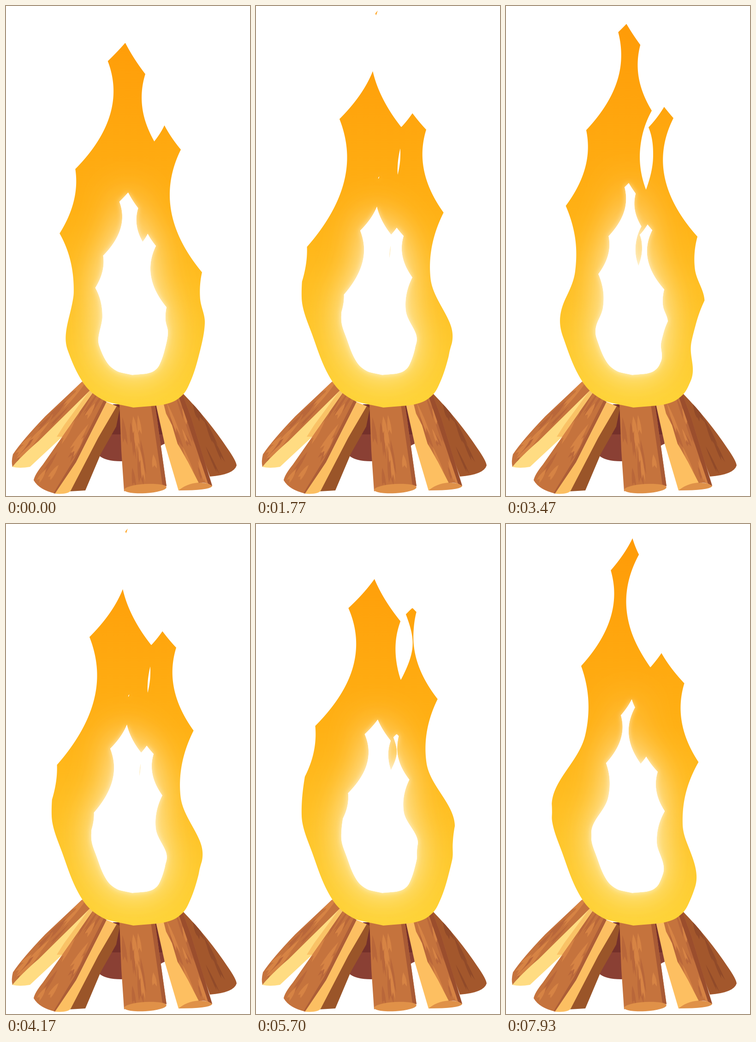
Animation, 529 px wide and 1058 px high, one loop 8000 ms. Source, as an HTML page with a canvas:

```html
<!DOCTYPE html>
<html lang="en">
<head>
<meta charset="utf-8">
<title>Campfire</title>
<style>
  html, body { margin: 0; width: 100%; height: 100%; overflow: hidden; background: #fff; }
  canvas { display: block; width: 100%; height: 100%; }
</style>
</head>
<body>
<canvas id="stage" width="529" height="1058"></canvas>
<script>
const canvas = document.getElementById('stage');
const ctx = canvas.getContext('2d');
const LOOP = 8000;
const FRAME = 1000 / 30;
const CYCLE = 6;
const BASE = 867;
const SPLIT = 460;
const MAX_BITE = 48;

// The flame is two fixed tongues. Crests climb along each edge and the edge
// is hollowed out between them. Edge keys are [y, x]; inward is the hollow's side.
const sides = {
  left: {
    inward: 1, lag: 0, from: 0,
    slow: age => climb(age, 743, 27, 5, 62.5),
    fast: age => 856 - 84 * age,
    edge: spline([[-50, 285], [0, 265], [118, 221], [306, 163], [497, 115], [630, 99],
      [710, 122], [810, 165], [852, 213], [BASE, 276]])
  },
  right: {
    inward: -1, lag: -1, from: 0,
    slow: age => climb(age, 810, 5, 8, 68),
    fast: age => 960 - 77 * age,
    edge: spline([[165, 340], [242, 363], [420, 402], [575, 425], [685, 431],
      [755, 418], [815, 398], [845, 377], [861, 340], [BASE, 276]])
  },
  innerRight: {
    inward: -1, lag: 0, from: -CYCLE,
    slow: age => 525 - 63 * age,
    fast: age => 306 - 80 * age,
    edge: spline([[-50, 268], [24, 281], [147, 302], [226, 316], [310, 330], [400, 338], [SPLIT, 338]])
  },
  innerLeft: {
    inward: 1, lag: 0, from: -CYCLE,
    slow: age => 570 - 75 * age,
    fast: age => 336 - 74 * age,
    edge: spline([[165, 340], [188, 327], [262, 309], [325, 286], [392, 264], [SPLIT, 250]])
  }
};

// Height after speeding up evenly from v to top speed.
function climb(age, y, v, acc, top) {
  const t = Math.min(age, (top - v) / acc);
  return y - v * t - acc * t * t / 2 - top * (age - t);
}

function spline(keys) {
  const slope = i => {
    const a = keys[Math.max(0, i - 1)], b = keys[Math.min(keys.length - 1, i + 1)];
    return (b[1] - a[1]) / (b[0] - a[0]);
  };
  return y => {
    let i = 0;
    while (i < keys.length - 2 && y > keys[i + 1][0]) i++;
    const [y0, x0] = keys[i], [y1, x1] = keys[i + 1];
    const h = y1 - y0, t = (y - y0) / h, u = 1 - t;
    return u * u * ((1 + 2 * t) * x0 + t * h * slope(i)) +
           t * t * ((3 - 2 * t) * x1 - u * h * slope(i + 1));
  };
}

function crestsAt(side, phase) {
  const list = [];
  for (let age = phase + side.lag - CYCLE; age < CYCLE * 4; age += CYCLE) {
    if (age < side.from) continue;
    const slow = side.slow(age), fast = side.fast(age);
    list.push(slow);
    if (fast < slow - 25) list.push(fast);
  }
  return list.sort((a, b) => a - b);
}

// Returns x for a given y on a hollowed edge.
function hollowed(side, phase) {
  const crests = crestsAt(side, phase);
  return y => {
    const i = crests.findIndex(c => c > y);
    if (i < 1) return side.edge(y);
    const chord = crests[i] - crests[i - 1];
    const t = (y - crests[i - 1]) / chord;
    const soft = crests[i] > 600 && t > 0.5;
    const bend = soft ? Math.sin(Math.PI * t) ** 2 : 4 * t * (1 - t);
    return side.edge(y) + side.inward * bend * Math.min(MAX_BITE, chord * chord / 1300);
  };
}

// Adds the area between two edges, leaving out heights where they cross.
function addBand(path, left, right, top, bottom) {
  let run = [];
  const flush = () => {
    if (run.length > 1) {
      run.forEach(([y, l], i) => i ? path.lineTo(l, y) : path.moveTo(l, y));
      run.reverse().forEach(([y, , r]) => path.lineTo(r, y));
      path.closePath();
    }
    run = [];
  };
  for (let y = top; y <= bottom; y++) {
    const l = left(y), r = right(y);
    if (l <= r) run.push([y, l, r]);
    else flush();
  }
  flush();
}

function flameAt(phase) {
  const path = new Path2D();
  const [left, right, innerRight, innerLeft] =
    [sides.left, sides.right, sides.innerRight, sides.innerLeft].map(s => hollowed(s, phase));
  addBand(path, left, innerRight, -4, SPLIT);
  addBand(path, innerLeft, right, 165, SPLIT);
  addBand(path, left, right, SPLIT - 1, BASE);
  return path;
}

function makeRandom(seed) {
  return () => (seed = (seed * 16807) % 2147483647) / 2147483647;
}

function fill(g, d, color) {
  const path = new Path2D(d);
  g.fillStyle = color;
  g.fill(path);
  return path;
}

// Long pointed flecks that follow the axis a-b inside a shape.
function grain(g, shape, a, b, spread, color, count, seed) {
  const rnd = makeRandom(seed * 7919);
  const len = Math.hypot(b[0] - a[0], b[1] - a[1]);
  g.save();
  g.clip(shape);
  g.translate(...a);
  g.rotate(Math.atan2(b[1] - a[1], b[0] - a[0]));
  g.fillStyle = color;
  for (let i = 0; i < count; i++) {
    const x = rnd() * len, y = (rnd() * 2 - 1) * spread;
    const l = 15 + rnd() * 25, w = 2 + rnd() * 3;
    g.beginPath();
    g.moveTo(x - l, y);
    g.quadraticCurveTo(x, y - w * 1.6, x + l, y - w);
    g.lineTo(x + l * 0.5, y);
    g.lineTo(x + l * 0.8, y + w);
    g.quadraticCurveTo(x, y + w * 1.4, x - l, y);
    g.fill();
  }
  g.restore();
}

function bark(g, d, a, b, spread, seed) {
  const shape = fill(g, d, '#c5733d');
  grain(g, shape, a, b, spread, '#b9673a', 7, seed);
  grain(g, shape, a, b, spread * 0.8, '#d68344', 7, seed + 1);
}

function drawLogs(g) {
  // back
  fill(g, 'M232 860H335L344 945L338 948L300 975L250 983Q215 983 201 970Z', '#8a4034');
  fill(g, 'M232 860H335L342 925H222Z', '#74302a');

  // far right
  const right = fill(g, 'M375 830L385 838Q440 895 480 955Q499 982 500 992Q494 1012 442 1016L400 900Z', '#a3572c');
  grain(g, right, [400, 870], [460, 1000], 24, '#914a29', 7, 71);

  // far left
  fill(g, 'M183 828L190 838L122 930L52 995Q30 999 13 995L26 968Z', '#ffdc82');
  fill(g, 'M183 828L190 838L122 930L110 930L126 905Z', '#f9c266');
  bark(g, 'M165 811L183 829L70 940Q32 972 14 995Q11 984 15 968Q35 938 85 886Z', [165, 822], [20, 975], 10, 13);

  // second from left
  fill(g, 'M238 862L247 868L239 908L206 966L172 1046L138 1048L200 925Z', '#9a5529');
  bark(g, 'M190 833L218 855L152 985L108 1053Q72 1045 60 1024Q62 1012 80 990L122 930Z', [203, 850], [85, 1030], 26, 29);
  fill(g, 'M218 855L152 985L108 1053L103 1052L148 978L212 851Z', '#ad5e37');
  fill(g, 'M218 855L240 864L200 932L140 1047Q133 1055 106 1053L152 985Z', '#fcbf62');

  // front right
  fill(g, 'M325 860L346 858L365 900L397 975L418 1030L374 1046L344 945Z', '#fdbf61');
  fill(g, 'M374 1046Q392 1031 418 1029Q444 1030 447 1037Q440 1046 374 1046Z', '#df9148');
  bark(g, 'M342 860L382 836L402 890L447 1036Q435 1027 418 1030L395 985L372 945L360 905L347 880Z',
    [362, 855], [425, 1025], 18, 47);
  fill(g, 'M382 836L402 890L447 1036L438 1031L394 900L374 842Z', '#9b4e2d');

  // centre
  bark(g, 'M246 860H323L348 1037Q300 1025 256 1048L250 960Z', [282, 865], [300, 1035], 34, 37);
  fill(g, 'M314 860H323L348 1037L339 1033Z', '#a95a35');
  g.fillStyle = '#e09148';
  g.beginPath();
  g.ellipse(302, 1042, 46, 10, -0.06, 0, Math.PI * 2);
  g.fill();
}

const logs = document.createElement('canvas');
logs.width = canvas.width;
logs.height = canvas.height;
drawLogs(logs.getContext('2d'));

const heat = ctx.createLinearGradient(0, 0, 0, BASE);
heat.addColorStop(0, '#ff9906');
heat.addColorStop(0.5, '#ffb014');
heat.addColorStop(1, '#fed335');

function drawCore(shape, blur, glow) {
  ctx.shadowColor = glow;
  ctx.shadowBlur = blur;
  ctx.fill(shape);
}

// The white core is the same flame at half size.
function draw(shape) {
  ctx.fillStyle = '#fff';
  ctx.fillRect(0, 0, canvas.width, canvas.height);
  ctx.drawImage(logs, 0, 0);
  ctx.fillStyle = heat;
  ctx.fill(shape);
  ctx.save();
  ctx.clip(shape);
  ctx.setTransform(0.5, 0, 0, 0.5, 135.5, 363);
  ctx.fillStyle = '#fff';
  drawCore(shape, 80, 'rgba(255,250,225,0.95)');
  drawCore(shape, 12, 'rgba(255,255,255,0.6)');
  ctx.restore();
}

const poses = Array.from({ length: CYCLE }, (_, phase) => flameAt(phase));

// 12.5 steps a second, snapped to a 30 Hz clock and 10 ms ticks.
const stepStart = n => Math.round(Math.ceil(n * 2.4) * FRAME / 10) * 10;

function stepAt(ms) {
  let n = Math.floor(ms / 80) + 1;
  while (n > 0 && stepStart(n) > ms) n--;
  return n;
}

const start = performance.now();
let shown = -1;

function tick(now) {
  const phase = stepAt(Math.max(0, now - start) % LOOP) % CYCLE;
  if (phase !== shown) draw(poses[shown = phase]);
  requestAnimationFrame(tick);
}
tick(start);
</script>
</body>
</html>
```
